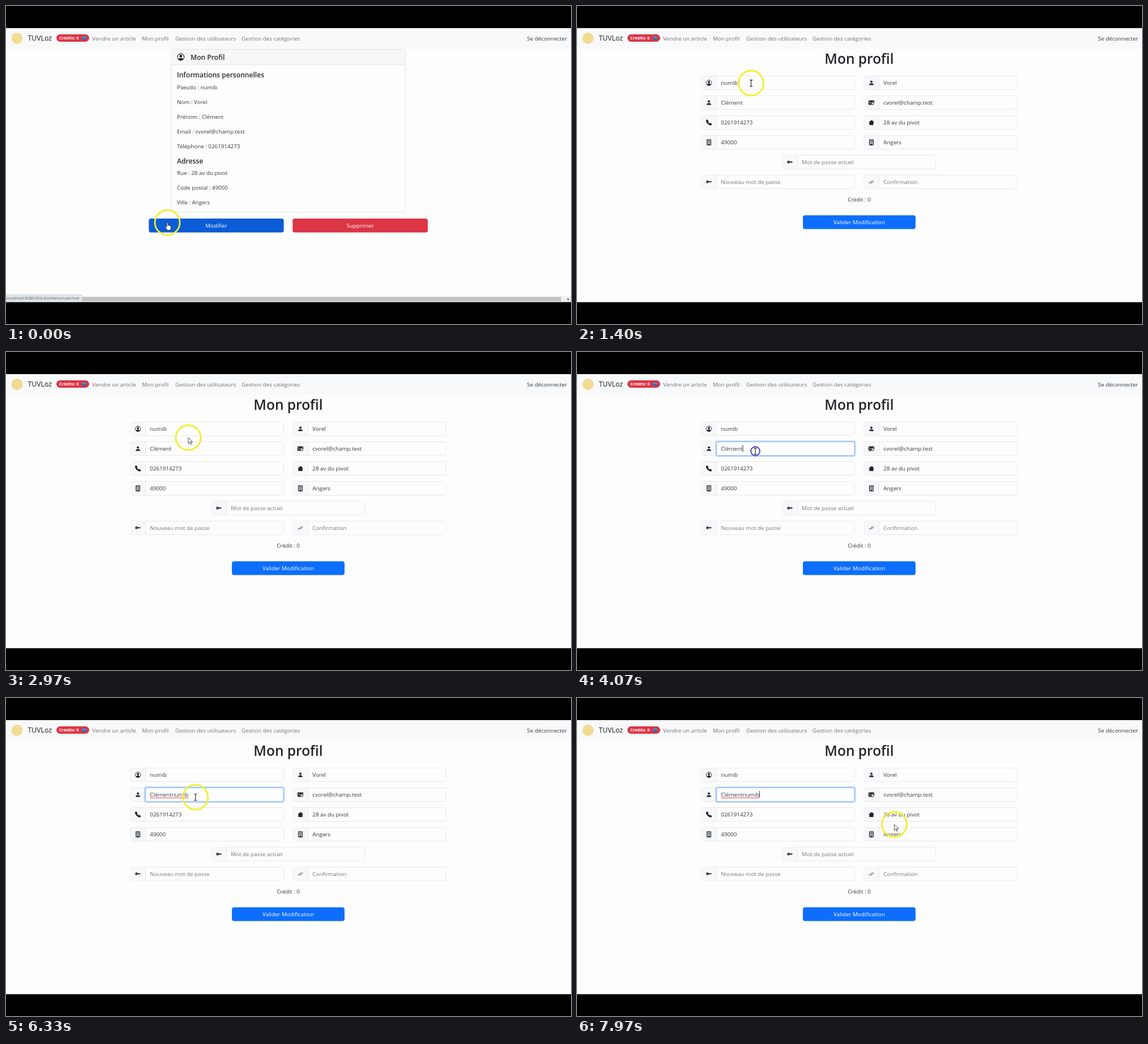
These frames come from a looping animation (998 px wide and 561 px high, 8 s). An HTML page:

```html
<!DOCTYPE html>
<html lang="fr">
<head>
<meta charset="utf-8">
<title>Mon profil</title>
<style>
  html, body { margin: 0; width: 100%; height: 100%; overflow: hidden; background: #000; }
  svg { display: block; width: 998px; height: 561px; }
  text { font-family: "Open Sans", "Noto Sans", sans-serif; font-size: 9.8px; fill: #33383d; white-space: pre; }
  .nav { fill: #727476; }
  .brand { font-size: 12.3px; fill: #1c1c1c; }
  .head { font-size: 12.1px; font-weight: 600; fill: #262a2e; }
  .title { font-size: 24.5px; font-weight: 600; fill: #212529; }
  .hint { fill: #73797f; }
  .badge { font-size: 7.4px; font-weight: 700; fill: #fff; }
  .status { font-size: 7.35px; fill: #5f6368; }
  .btn { fill: #fff; }
</style>
</head>
<body>
<svg id="stage" viewBox="0 0 998 561"></svg>
<script>
const LOOP = 8000;
const PAGE_SWITCH = 600;
const FOCUS = 3930;
const CLICKS = [250, FOCUS];
const RING_BACK = 6200;
const UNDERLINE = 6050;
const FIRST_NAME = 'Clément';
const USER = 'numib';
const KEY_TIMES = [5020, 5200, 5330, 5450, 5560];

// time, x, y of the pointer
const PATH = [
  [0, 285, 382], [760, 285, 382], [1300, 307.5, 136], [2200, 307.5, 136],
  [2750, 322, 151], [3150, 322, 151], [3700, 315, 175], [6200, 315, 175],
  [6950, 559, 173], [7300, 559, 173], [7900, 560.5, 223], [8000, 560.5, 223]
];

const text = (x, y, str, cls = '', anchor = 'start') =>
  `<text x="${x}" y="${y}" class="${cls}" text-anchor="${anchor}">${str}</text>`;
const rect = (x, y, w, h, fill, rest = '') =>
  `<rect x="${x}" y="${y}" width="${w}" height="${h}" fill="${fill}" ${rest}/>`;

const icons = {
  account: `<circle cx="8" cy="8" r="7.3" fill="none" stroke="#212529" stroke-width="1.4"/>
    <circle cx="8" cy="6" r="3"/><path d="M2.5 13c1-2 3-3 5.5-3s4.5 1 5.5 3a7.5 7.5 0 0 1-11 0z"/>`,
  person: `<circle cx="8" cy="5" r="3"/><path d="M2 13c0-3 3-4 6-4s6 1 6 4q0 1-1 1H3q-1 0-1-1z"/>`,
  mail: `<rect y="2" width="16" height="12" rx="2"/>
    <path d="M0 4l8 5 8-5M0 13l6-5" fill="none" stroke="#f8f9fa"/>
    <circle cx="12.8" cy="12" r="4" fill="#f8f9fa"/>
    <path d="M10.5 12l1.7 1.8 3-3.6" fill="none" stroke="#212529" stroke-width="1.6"/>`,
  phone: `<path d="M2 .5q1.5-1 2.6.2L6.3 3q.5.7.3 1.5L6 6.7q0 .4.2.6l2.5 2.5q.3.2.6.1l2.2-.5q.8-.2 1.5.3l2.3 1.8q1.2 1.2.1 2.6l-1 1q-1.2 1.2-2.9.7Q7.5 14.5 4.4 11.4T.2 4.4Q-.4 2.7.8 1.5z"/>`,
  house: `<path d="M8 1L.5 8.5h2V15h11V8.5h2L13 6V2.5h-2V4z"/>`,
  building: `<path d="M2.7.7h10.6v14.6H2.7z" fill="#b9bdc1" stroke="#212529" stroke-width="1.5"/>
    <path d="M5.5 2.5v8M8 2.5v8M10.5 2.5v8" stroke="#212529" stroke-width="1.3" stroke-dasharray="1.4 1.3"/>
    <path d="M6 12h4v4H6z"/>`,
  key: `<path d="M4 4.4a3.6 3.6 0 1 0 3.3 5H14l1.6-1.6L14 6.4H7.3A3.6 3.6 0 0 0 4 4.4z"/>
    <circle cx="3" cy="8" r="1.1" fill="#f8f9fa"/>`,
  checks: `<path d="M1 8.5l3.2 3.2 6.3-7.2M7.2 10.8l1 .9 6.5-7.2" fill="none" stroke="#6c757d" stroke-width="1.6"/>`
};
const icon = (name, cx, cy, size = 10.5) =>
  `<g transform="translate(${cx - size / 2} ${cy - size / 2}) scale(${size / 16})" fill="#212529">${icons[name]}</g>`;

const button = (x, y, w, h, fill, label) =>
  rect(x, y, w, h, fill, 'rx="4"') + text(x + w / 2, y + h / 2 + 3.6, label, 'btn', 'middle');

// icon, left edge, centre line, content
const EMAIL = 'cvorel@champ.test', PHONE = '0261914273', STREET = '28 av du pivot', LAST_NAME = 'Vorel';
const FIELDS = [
  ['account', 220, 135.5, USER], ['person', 507, 135.5, LAST_NAME],
  ['person', 220, 170.5, FIRST_NAME, '', 'name'], ['mail', 507, 170.5, EMAIL],
  ['phone', 220, 205.5, PHONE], ['house', 507, 205.5, STREET],
  ['building', 220, 240.5, '49000'], ['building', 507, 240.5, 'Angers'],
  ['key', 363, 275.3, 'Mot de passe actuel', 'hint'],
  ['key', 220, 310.2, 'Nouveau mot de passe', 'hint'], ['checks', 507, 310.2, 'Confirmation', 'hint']
];
const field = ([name, x, cy, value, cls = '', id]) => {
  const top = cy - 12;
  const focus = id ? `<g id="focus">${rect(246.5, top, 243.5, 24, '#fff', 'rx="2" stroke="#0d6efd" stroke-opacity=".25" stroke-width="5"')}
    ${rect(246.5, top, 243.5, 24, '#fff', 'rx="2" stroke="#86b7fe"')}</g>` : '';
  return rect(x, top, 270.5, 24, '#fdfdfd', 'rx="3.5" stroke="#e4e7eb" stroke-width=".9"') +
    rect(x + .4, top + .4, 26, 23.2, '#f7f8fa', 'rx="3"') +
    rect(x + 26.2, top, .8, 24, '#e4e7eb') + icon(name, x + 13, cy) + focus +
    `<g ${id ? `id="${id}"` : ''}>${text(x + 34.3, cy + 3.7, value, cls)}</g>`;
};

const header = rect(0, 39, 998, 483.5, '#fdfdfd') + rect(0, 39, 998, 36, '#f8f9fa') +
  '<circle cx="19.5" cy="57" r="10" fill="#f1dc92"/>' +
  text(38.5, 61, 'TUVLoz', 'brand') +
  rect(89, 50, 58, 13, '#dc3545', 'rx="6.5"') + text(94, 59.4, 'Crédits: 0', 'badge') +
  '<path d="M135.5 54h5l2 2.5-4.5 4.5-4.5-4.5z" fill="#3c9be0"/><path d="M133.5 56.5h9L138 61z" fill="#1d6fb8"/>' +
  [[152, 'Vendre un article'], [240, 'Mon profil'], [299, 'Gestion des utilisateurs'], [416, 'Gestion des catégories']]
    .map(([x, s]) => text(x, 60.6, s, 'nav')).join('') +
  text(991, 60.6, 'Se déconnecter', '', 'end');

const details = [
  [143, `Pseudo : ${USER}`], [169, `Nom : ${LAST_NAME}`], [195, `Prénom : ${FIRST_NAME}`],
  [221, `Email : ${EMAIL}`], [247, `Téléphone : ${PHONE}`],
  [294, `Rue : ${STREET}`], [320, 'Code postal : 49000'], [346, 'Ville : Angers']
];
const profile = rect(292, 76.5, 413.5, 287.5, '#fdfdfd', 'rx="4" stroke="#dedfe0" stroke-width=".9"') +
  rect(292.5, 77, 412.5, 26, '#f7f7f8', 'rx="3.5"') + rect(292, 102.8, 413.5, .8, '#dedfe0') +
  icon('account', 308.7, 90, 13) + text(326, 94.6, 'Mon Profil', 'head') +
  text(302, 126.4, 'Informations personnelles', 'head') + text(302, 277.6, 'Adresse', 'head') +
  details.map(([y, s]) => text(302, y + 3.6, s)).join('') +
  button(252.3, 375, 238.3, 24.4, '#0b5cd6', 'Modifier') +
  button(506.3, 375, 238.7, 24.4, '#dc3545', 'Supprimer') +
  rect(0, 512, 998, 10.5, '#f1f1f1') + rect(100, 513.3, 880.5, 7.8, '#c3c3c3') +
  '<path d="M991.8 515l2.8 2.4-2.8 2.4z" fill="#444"/>' +
  rect(-3, 509, 137.5, 16, '#e1e5e9', 'rx="3" stroke="#c9cdd1" stroke-width=".6"') +
  text(.8, 518.3, 'localhost:8080/ENI-Encheres/user/me', 'status') +
  rect(0, 522.5, 998, 38.5, '#000');

const form = text(498.5, 101.6, 'Mon profil', 'title', 'middle') +
  FIELDS.map(field).join('') +
  rect(0, 175.7, 0, 1, '#dd3b3b', 'id="spell"') + rect(0, 164, .9, 12, '#222', 'id="caret"') +
  text(498.5, 344.6, 'Crédit : 0', '', 'middle') +
  button(399, 369.2, 199, 24.3, '#0d6efd', 'Valider Modification');

const pointer = `<g id="pointer"><circle id="ring" fill="none"/>
  <path id="arrow" d="M0 0v10.4l2.5-2.3 1.7 3.9 1.7-.8-1.7-3.7h3.2z" fill="#fff" stroke="#222" stroke-width=".8"/>
  <path id="beam" d="M-2.4-5.4h1.5q.9 0 .9.8.1-.8 1-.8h1.5M0-4.6v9.4M-2.4 5.6h1.5q.9 0 .9-.8.1.8 1 .8h1.5" fill="none" stroke="#222" stroke-width="1.1"/>
  <path id="hand" d="M-1 1.2q0-1.3 1.1-1.3t1.1 1.3v4l.4-.4q1.2-.5 1.6.5 1.3-.5 1.7.6 1.5-.3 1.5 1.2v2.7q0 1.6-1 2.7v1.2H-.5v-1.2L-3.4 8.4q-.6-1 .2-1.5.8-.4 1.5.4l.7.7z" fill="#fff" stroke="#222" stroke-width=".9"/></g>`;

document.getElementById('stage').innerHTML = rect(0, 0, 998, 561, '#000') + header +
  `<g id="profile">${profile}</g><g id="form">${form}</g>` + pointer;

const $ = id => document.getElementById(id);
const el = Object.fromEntries(['profile', 'form', 'focus', 'spell', 'caret', 'pointer', 'ring', 'arrow', 'beam', 'hand']
  .map(id => [id, $(id)]));
const nameText = $('name').firstElementChild;
const set = (node, attrs) => { for (const k in attrs) node.setAttribute(k, attrs[k]); };
const show = (node, on) => set(node, { visibility: on ? 'visible' : 'hidden' });
const clamp = v => Math.min(1, Math.max(0, v));

function position(t) {
  let i = 0;
  while (i < PATH.length - 2 && t >= PATH[i + 1][0]) i++;
  const [t0, x0, y0] = PATH[i], [t1, x1, y1] = PATH[i + 1];
  const p = clamp((t - t0) / (t1 - t0)), e = p * p * (3 - 2 * p);
  return [x0 + (x1 - x0) * e, y0 + (y1 - y0) * e];
}

function cursorShape(t, x, y) {
  if (t < PAGE_SWITCH) return 'hand';
  if (x > 399 && x < 598 && y > 369 && y < 394) return 'hand';
  return FIELDS.some(([, fx, fy]) => x > fx + 27 && x < fx + 270 && Math.abs(y - fy) < 12) ? 'beam' : 'arrow';
}

function drawPointer(t) {
  const [x, y] = position(t), shape = cursorShape(t, x, y);
  set(el.pointer, { transform: `translate(${x} ${y})` });
  for (const s of ['arrow', 'beam', 'hand']) show(el[s], s === shape);
  const click = CLICKS.find(c => t >= c && t < c + 200);
  const pressed = click !== undefined;
  set(el.ring, {
    r: pressed ? 22 - (t - click) / 10 : 22,
    stroke: pressed ? '#4747cf' : '#f3ef2e',
    'stroke-width': pressed ? 2 : 2.8
  });
  show(el.ring, pressed || t < FOCUS || t >= RING_BACK);
}

function draw(t) {
  const editing = t >= PAGE_SWITCH;
  set(el.profile, { display: editing ? 'none' : 'inline' });
  set(el.form, { display: editing ? 'inline' : 'none' });

  const typed = KEY_TIMES.filter(k => t >= k).length;
  const value = FIRST_NAME + USER.slice(0, typed);
  if (nameText.textContent !== value) nameText.textContent = value;
  const width = editing ? nameText.getComputedTextLength() : 0;
  const lastInput = typed ? KEY_TIMES[typed - 1] : FOCUS;
  set(el.focus, { opacity: clamp((t - FOCUS) / 130) });
  set(el.caret, { x: 254.3 + width, opacity: t >= FOCUS && (t - lastInput) % 1060 < 530 ? 1 : 0 });
  set(el.spell, { x: 254.3, width, opacity: t >= UNDERLINE ? 1 : 0 });
  drawPointer(t);
}

const start = performance.now();
function tick() {
  draw((performance.now() - start) % LOOP);
  requestAnimationFrame(tick);
}
tick();
</script>
</body>
</html>
```
